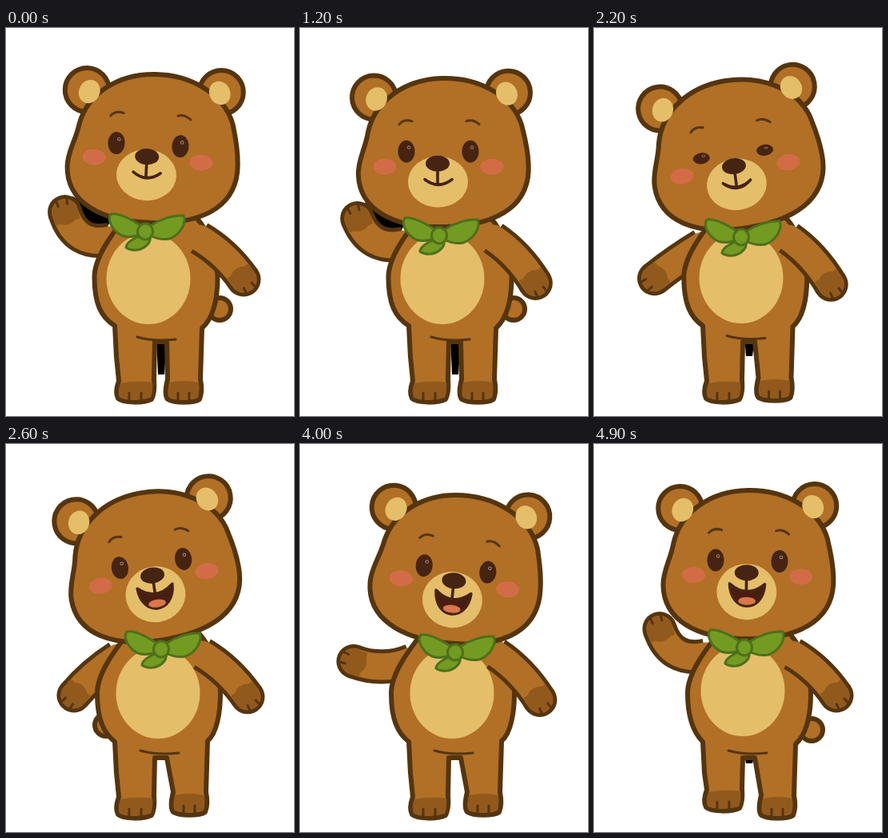
An HTML page for the animation above (5 s loop, 360 by 486 pixels).

```html
<!DOCTYPE html>
<html lang="en">
<head>
<meta charset="utf-8">
<title>Waving bear</title>
<style>
  html, body { margin: 0; width: 100%; height: 100%; overflow: hidden; background: #fff; }
  svg { display: block; width: 100%; height: 100%; }
  .fur { fill: #b17025; stroke: #55350f; stroke-width: 6; stroke-linejoin: round; }
  .cream { fill: #e5be69; }
  .dark { fill: #452412; }
  .paw { fill: #92591d; }
  .pen { fill: none; stroke: #452412; stroke-width: 3.6; stroke-linecap: round; stroke-linejoin: round; }
  .thin { fill: none; stroke: #55350f; stroke-width: 3; stroke-linecap: round; }
  .leaf { fill: #739b22; stroke: #4d701a; stroke-width: 3; stroke-linejoin: round; }
  .cheek { fill: #d66b4b; opacity: .9; }
  .limb { fill: none; }
</style>
</head>
<body>
<svg viewBox="0 0 360 486">
  <path id="armGap" d="M81 211L131 238L122 256L86 250Z"/>
  <path id="legGap"/>
  <circle id="tail" class="fur" r="14"/>
  <g id="armL"></g>
  <path id="body" class="fur"/>
  <ellipse id="belly" class="cream" rx="52.5" ry="57"/>
  <path id="crotch" class="thin" d="M164 387Q184 393 212 390"/>
  <g id="footL">
    <path class="paw" d="M143 445Q164 441 183 444Q184 455 181 463Q160 468 142 463Q140 455 143 445Z"/>
    <path class="thin" d="M154 466v-9M169 466v-9"/>
  </g>
  <g id="footR">
    <path class="paw" d="M204 444Q224 440 241 444Q242 455 240 463Q222 468 204 463Q202 455 204 444Z"/>
    <path class="thin" d="M215 466v-9M229 466v-9"/>
  </g>
  <g id="armR"></g>
  <g id="head">
    <circle class="fur" cx="-85" cy="-72" r="27.5"/>
    <circle class="fur" cx="83" cy="-72" r="27.5"/>
    <path class="fur" d="M0-93C-46-93-84-68-94-29C-98-8-108 5-108 24C-108 66-70 93 0 93C70 93 106 66 105 18C105-2 101-18 98-32C87-69 46-93 0-93Z"/>
    <ellipse class="cream" cx="-82" cy="-70" rx="13" ry="15" transform="rotate(25 -82 -70)"/>
    <ellipse class="cream" cx="81" cy="-71" rx="13" ry="15" transform="rotate(-25 81 -71)"/>
  </g>
  <g id="face">
    <path class="thin" d="M-49-34Q-43-41-33-38M35-38Q43-41 51-34"/>
    <ellipse class="cheek" cx="-67" cy="19" rx="14.5" ry="10"/>
    <ellipse class="cheek" cx="67" cy="19" rx="14.5" ry="10"/>
    <ellipse id="muzzle" class="cream" cx="-.5" rx="37.5"/>
    <g id="eyes">
      <g id="eyeL"><ellipse class="dark" rx="10.5" ry="14"/><circle cx="3" cy="-5" r="1.8" fill="none" stroke="#a98763"/></g>
      <g id="eyeR"><ellipse class="dark" rx="10.5" ry="14"/><circle cx="2" cy="-5" r="1.8" fill="none" stroke="#a98763"/></g>
    </g>
    <path id="lids" class="pen" d="M-52 2Q-42-2-30 1M30 1Q42-2 52 2"/>
    <path class="pen" d="M-1 22V40"/>
    <path id="mouth" class="pen" style="fill:#4a1d11"/>
    <ellipse id="tongue" cy="50.5" rx="11" ry="5" fill="#d9774a"/>
    <ellipse class="dark" cx="-1" cy="15" rx="15" ry="10"/>
  </g>
  <g id="bow" class="leaf">
    <path d="M-6 5C-14 8-24 14-24 20C-17 25-6 24 1 18C6 14 7 10 6 5Z"/>
    <path d="M-6-8C-20-17-34-24-43-22C-48-14-41-1-29 5C-20 8-12 6-6 4Z"/>
    <path d="M6-7C18-15 34-21 48-20C52-11 44 4 30 9C20 11 12 8 6 5Z"/>
    <ellipse rx="9.5" ry="10"/>
  </g>
</svg>
<script>
const LOOP = 5000, STEP = 100;

// Head place and tilt, and the angle of the waving arm (positive hangs down).
const poses = [
  { t: 0,    x: 185, y: 151, tilt: 1,    arm: -31 },
  { t: 1200, x: 180, y: 156, tilt: -2,   arm: -28 },
  { t: 1800, x: 174, y: 163, tilt: -8.5, arm: 21 },
  { t: 2600, x: 184, y: 153, tilt: -10,  arm: 41 },
  { t: 3400, x: 187, y: 154, tilt: -5,   arm: 34 },
  { t: 4000, x: 197, y: 157, tilt: 4,    arm: 1 },
  { t: 4900, x: 194, y: 151, tilt: -1,   arm: -30 }
];

const $ = id => document.getElementById(id);
const set = (id, attrs) => { for (const k in attrs) $(id).setAttribute(k, attrs[k]); };
const place = (id, x, y, a = 0) => set(id, { transform: `translate(${x} ${y}) rotate(${a})` });
const ramp = (t, a, b) => {
  const u = Math.min(1, Math.max(0, (t - a) / (b - a)));
  return u * u * (3 - 2 * u);
};

// Smooth curve through the poses; turning points stay flat so nothing overshoots.
function slope(key, i) {
  if (i === 0 || i === poses.length - 1) return 0;
  const rate = j => (poses[j + 1][key] - poses[j][key]) / (poses[j + 1].t - poses[j].t);
  const a = rate(i - 1), b = rate(i);
  return a * b > 0 ? 2 * a * b / (a + b) : 0;
}
function sample(key, t) {
  let i = 0;
  while (i < poses.length - 2 && t >= poses[i + 1].t) i++;
  const p = poses[i], q = poses[i + 1], h = q.t - p.t, u = (t - p.t) / h, w = 1 - u;
  return p[key] * (1 + 2 * u) * w * w + q[key] * u * u * (3 - 2 * u)
    + h * u * w * (slope(key, i) * w - slope(key, i + 1) * u);
}

// A limb is a thick curve with a rounded hand, a darker paw and two finger lines.
function limb(id, sx, sy, ex, ey, hx, hy) {
  const len = Math.hypot(hx - ex, hy - ey), dx = (hx - ex) / len, dy = (hy - ey) / len;
  const at = (f, s) => `${hx + dx * f - dy * s} ${hy + dy * f + dx * s}`;
  const curve = `M${sx} ${sy}Q${ex} ${ey} ${hx} ${hy}`;
  const stroke = (d, c, w, cap) =>
    `<path class="limb" d="${d}" stroke="${c}" stroke-width="${w}" stroke-linecap="${cap}"/>`;
  const palm = (c, r) => `<circle cx="${hx}" cy="${hy}" r="${r}" fill="${c}"/>`;
  $(id).innerHTML = stroke(curve, '#55350f', 43, 'butt') + palm('#55350f', 21.5)
    + stroke(curve, '#b17025', 33, 'round')
    + stroke(`M${at(-13, 0)}L${at(0.5, 0)}`, '#92591d', 32, 'butt') + palm('#92591d', 16.3)
    + `<path class="thin" d="M${at(9, -6)}L${at(17, -7)}M${at(9, 6)}L${at(17, 7)}"/>`;
}

// Torso moves by b, left foot by ly, right foot by rx and ry.
function bodyPath(b, ly, rx, ry) {
  const shift = (dx, dy) => (x, y) => `${x + dx} ${y + dy} `;
  const p = shift(b, 0), l = shift(0, ly), r = shift(rx, ry);
  return `M${p(152, 235)}C${p(139, 252)}${p(112, 285)}${p(112, 312)}`
    + `C${p(112, 345)}${p(120, 362)}136 373 L138 412 L${l(141, 442)}`
    + `C${l(138, 450)}${l(137, 458)}${l(140, 464)}C${l(146, 470)}${l(172, 470)}${l(182, 465)}`
    + `C${l(187, 455)}${l(185, 445)}${l(185, 440)}L186 393 L201 393 L${r(202, 440)}`
    + `C${r(200, 448)}${r(198, 460)}${r(202, 465)}C${r(210, 470)}${r(235, 470)}${r(242, 465)}`
    + `C${r(246, 455)}${r(244, 445)}${r(243, 440)}L${r(245, 376)}`
    + `C${p(262, 362)}${p(266, 335)}${p(266, 312)}C${p(266, 285)}${p(255, 255)}${p(240, 238)}Z`;
}

function mouthPath(o) {
  const w = 17 + 5 * o, y = 35 - 6 * o, cx = w * (1 / 3 + 0.6 * o), cy = y + 9 + 28 * o;
  return `M${-w} ${y}Q0 ${y + 13 + 6 * o} ${w} ${y}C${cx} ${cy} ${-cx} ${cy} ${-w} ${y}Z`;
}

function draw(t) {
  const [x, y, tilt, arm] = ['x', 'y', 'tilt', 'arm'].map(key => sample(key, t));
  const turn = ramp(t, 1800, 2600), settle = ramp(t, 4000, 4900);
  const open = ramp(t, 2150, 2500);
  const shut = ramp(t, 1400, 1700) * (1 - ramp(t, 2050, 2350));
  const bodyX = -1.5 + 3.5 * turn + 3 * settle;
  const liftL = -9 * settle, footX = 7 * turn, footY = -4 * turn * (1 - settle);

  place('head', x, y, tilt);
  place('face', x - 7 + 5 * turn, y - 2 + 0.7 * (y - 155), tilt + 2);
  place('bow', 174 + 20 * turn - 6 * settle, y + 104);
  place('tail', 267 - 142 * turn + 147 * ramp(t, 3000, 4900), 352 + 6 * settle);
  place('crotch', 4 * turn, -3 * turn);
  place('footL', 0, liftL);
  place('footR', footX, footY);
  set('belly', { cx: 178 + 12 * turn - 4 * settle, cy: 314 - 2 * turn - 3 * settle });
  set('body', { d: bodyPath(bodyX, liftL, footX, footY) });
  set('legGap', { d: `M188 388H201L198 ${388 + 46 * (1 - turn) + 12 * settle}H190Z` });

  // The elbow sags more the higher the arm is raised.
  const a = arm * Math.PI / 180, reach = 73 - 6 * ramp(-arm, 0, 30), sag = 15 - arm / 2;
  const lx = 131 + 9 * turn, ly = y + 114;
  const hx = lx - reach * Math.cos(a), hy = ly + reach * Math.sin(a);
  limb('armL', lx, ly, (lx + hx) / 2 - sag * Math.sin(-a), (ly + hy) / 2 + sag * Math.cos(a), hx, hy);
  place('armGap', hx - 72, hy - 231);
  set('armGap', { opacity: t < 1350 ? 1 : 0 });

  const sx = 243 + bodyX, sy = 263, drop = 0.9 * (y - 151);
  const rx = 297 + 6 * turn - 0.6 * drop, ry = 315 + drop;
  limb('armR', sx, sy, (sx + rx) / 2 + 5, (sy + ry) / 2 - 7, rx, ry);

  const closed = shut > 0.85;
  for (const [id, ex] of [['eyeL', -40], ['eyeR', 40]])
    set(id, { transform: `translate(${ex} 0) scale(1 ${Math.max(0.1, 1 - shut)})` });
  set('eyes', { opacity: closed ? 0 : 1 });
  set('lids', { opacity: closed ? 1 : 0 });
  set('muzzle', { cy: 38 + open, ry: 32 + 3 * open });
  set('mouth', { d: mouthPath(open) });
  set('tongue', { opacity: open > 0.7 ? 1 : 0 });
}

const start = performance.now();
function tick() {
  const t = (performance.now() - start) % LOOP;
  draw(Math.floor(t / STEP) * STEP);
  requestAnimationFrame(tick);
}
tick();
</script>
</body>
</html>
```
